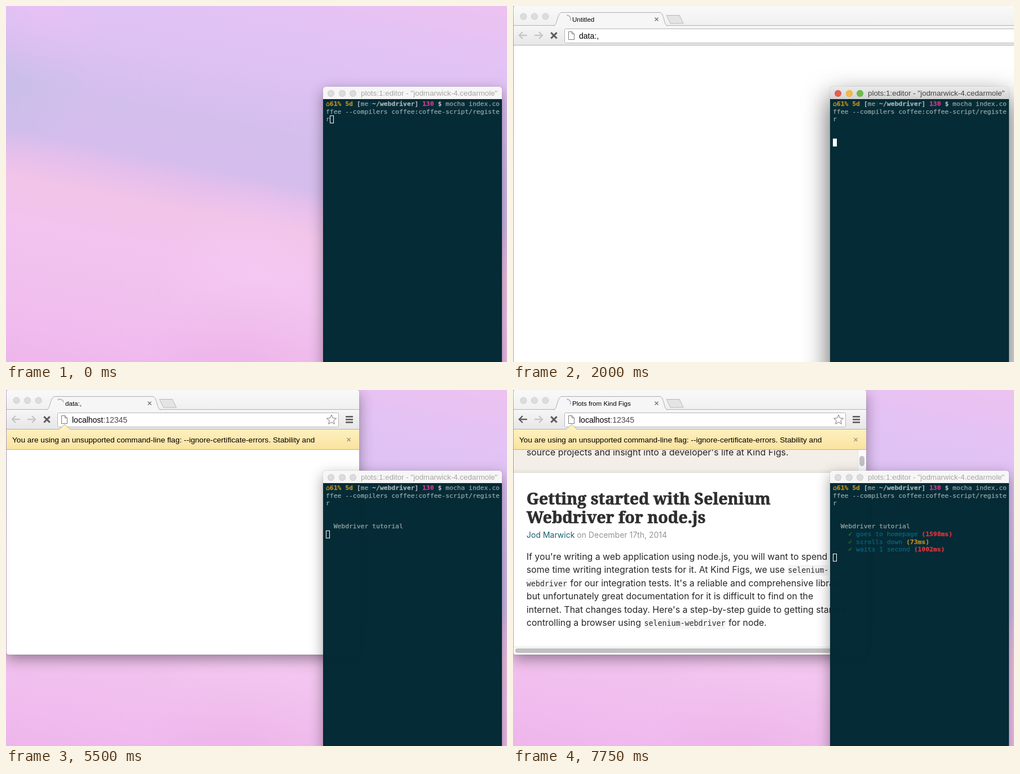
Write an HTML page with a canvas that moves like this. It is 888 px wide and 631 px high and loops after 8 s.

```html
<!DOCTYPE html>
<html lang="en">
<head>
<meta charset="utf-8">
<title>Webdriver tutorial run</title>
<style>
html, body { margin: 0; width: 100%; height: 100%; overflow: hidden; }
#stage { position: relative; width: 888px; height: 631px; overflow: hidden; font-family: "Liberation Sans", Arial, sans-serif; }
#stage canvas, .abs { position: absolute; white-space: nowrap; }
#wall, #bar { left: 0; top: 0; }

#browser { position: absolute; left: 1px; top: 0; overflow: hidden; background: #fff; border-radius: 4px; }
#inner { position: absolute; left: -1px; top: 0; }
#tab { left: 105px; top: 13px; font-size: 11.6px; line-height: 21px; color: #000; }
#url { left: 117px; top: 43px; font-size: 14px; line-height: 20px; color: #000; }
#port { color: #4a4a4a; }
#info { left: 11px; top: 78px; font-size: 13.65px; line-height: 21px; color: #000; }

#page { position: absolute; left: 1px; top: 106px; width: 625px; height: 363px; overflow: hidden; }
#view { position: absolute; left: 0; top: 0; width: 610px; height: 349px; overflow: hidden; }
#doc { position: absolute; left: -1px; width: 626px; height: 1200px; font: 15.85px/23.4px Inter, sans-serif; color: #262626; }
#head { left: 0; top: 106px; width: 626px; height: 236px; background: #f3efe8; box-shadow: inset 0 -8px 10px -8px rgba(0,0,0,.14); }
#logo { left: 1px; top: 124px; width: 72px; height: 72px; border-radius: 50%; background: #383733; }
.serif { font-family: "Noto Serif", serif; font-weight: 700; color: #2e2e2e; -webkit-text-stroke: .025em #2e2e2e; }
#name { left: 89px; top: 128px; font-size: 51.5px; line-height: 60px; }
#headline { left: 24px; top: 371px; font-size: 28.5px; line-height: 33px; }
.link { color: #145f70; }
.nav { top: 155px; }
#intro { left: 24px; top: 224px; }
#byline { left: 24px; top: 440px; font-size: 14px; color: #949494; }
#body { left: 24px; top: 479px; }
code { font: 13.3px/1 "DejaVu Sans Mono", monospace; background: #f5f5f5; padding: 2px 0; margin: 0 1px; color: #2c2c2c; }
.track { background: #fafafa; }
.thumb { background: #c1c1c1; border-radius: 5px; }
#bubble { left: 0; top: 343px; width: 208px; height: 20px; box-sizing: border-box; padding-left: 5px; background: #f0f0f0; border: 1px solid #bcbcbc; border-width: 1px 1px 0 0; border-radius: 0 4px 0 0; font-size: 11.5px; line-height: 19px; color: #555; }

#term { position: absolute; left: 562px; top: 143px; width: 317px; height: 560px; border-radius: 5px 5px 0 0; }
#title { left: 0; top: 0; width: 317px; height: 22px; border-radius: 5px 5px 0 0; font-size: 13.35px; line-height: 23px; }
#title b { position: absolute; top: 5.5px; width: 12px; height: 12px; border-radius: 50%; box-shadow: inset 0 0 0 1px rgba(0,0,0,.08); }
#title span { position: absolute; left: 67px; }
#shell { left: 0; top: 22px; width: 317px; height: 540px; background: rgba(2,41,51,.985); }
pre { position: absolute; left: 5px; top: 2px; margin: 0; font: 11.37px/13.67px "DejaVu Sans Mono", monospace; color: #98a5a5; -webkit-text-stroke: .25px; }
.hi { color: #a8b3b3; font-weight: 700; }
.gold { color: #c08f1c; font-weight: 700; }
.pink { color: #d63a86; font-weight: 700; }
.red { color: #e8343a; font-weight: 700; }
.dim { color: #14506a; }
.step { color: #0b6680; }
.tick { color: #3f8420; }
#caret { position: absolute; width: 7px; height: 14px; box-sizing: border-box; border: 1px solid #fff; }
</style>
</head>
<body>
<div id="stage">
  <canvas id="wall" width="888" height="631"></canvas>

  <div id="browser"><div id="inner">
    <canvas id="bar" width="900" height="106"></canvas>
    <span class="abs" id="tab"></span>
    <span class="abs" id="url"><span id="host"></span><span id="port"></span></span>
    <span class="abs" id="info">You are using an unsupported command-line flag: --ignore-certificate-errors. Stability and<span id="rest"> security will suffer.</span></span>
    <div id="page">
      <div id="view"><div id="doc">
        <div class="abs" id="head"></div>
        <div class="abs" id="logo"></div>
        <div class="abs serif" id="name">Plots</div>
        <span class="abs link nav" style="left:277px">Blog</span>
        <span class="abs link nav" style="left:339px">Open Source</span>
        <span class="abs link nav" style="left:466px">News</span>
        <div class="abs" id="intro">Plots is the developer site from the team building the platform for local food<br>shopping and distribution at <span class="link">kindfigs.com</span>. Here we share our<br>experiences building applications with full-stack JavaScript, our open<br>source projects and insight into a developer's life at Kind Figs.</div>
        <div class="abs serif" id="headline">Getting started with Selenium<br>Webdriver for node.js</div>
        <div class="abs" id="byline"><span class="link">Jod Marwick</span> on December 17th, 2014</div>
        <div class="abs" id="body">If you're writing a web application using node.js, you will want to spend<br>some time writing integration tests for it. At Kind Figs, we use <code>selenium-</code><br><code style="margin-left:0">webdriver</code> for our integration tests. It's a reliable and comprehensive library<br>but unfortunately great documentation for it is difficult to find on the<br>internet. That changes today. Here's a step-by-step guide to getting started<br>controlling a browser using <code>selenium-webdriver</code> for node.</div>
      </div></div>
      <div class="abs track" style="left:610px;top:0;width:15px;height:363px;box-shadow:inset 1px 0 #e4e4e4"></div>
      <div class="abs track" style="left:0;top:349px;width:610px;height:14px;box-shadow:inset 0 1px #e4e4e4"></div>
      <div class="abs thumb" id="vthumb" style="left:613px;width:9px;height:18px"></div>
      <div class="abs thumb" style="left:3px;top:352px;width:580px;height:8px"></div>
      <div class="abs" id="bubble">Waiting for localhost...</div>
    </div>
  </div></div>

  <div id="term">
    <div class="abs" id="title"><b style="left:8px"></b><b style="left:27.5px"></b><b style="left:47px"></b><span>plots:1:editor - "jodmarwick-4.cedarmole"</span></div>
    <div class="abs" id="shell">
<pre><span class="gold">⌂61% 5d</span> <span class="hi">[</span>me<span class="dim">:</span><span class="hi">~/webdriver]</span> <span class="pink">130</span> <span class="hi">$</span> mocha index.co
ffee --compilers coffee:coffee-script/registe
r


<span data-from="5000">  Webdriver tutorial</span>
<span data-from="6750">    <span class="tick">✓</span> <span class="step">goes to homepage</span> <span class="red">(1598ms)</span></span>
<span data-from="6750">    <span class="tick">✓</span> <span class="step">scrolls down</span> <span class="gold">(73ms)</span></span>
<span data-from="7750">    <span class="tick">✓</span> <span class="step">waits 1 second</span> <span class="red">(1002ms)</span></span></pre>
      <div id="caret"></div>
    </div>
  </div>
</div>

<script>
const LOOP = 8000;
const $ = id => document.getElementById(id);
const show = (el, on) => { el.style.display = on ? '' : 'none'; };
const between = (t, a, b) => t >= a && t < b;
const lights = [...document.querySelectorAll('#title b')];
const lines = [...document.querySelectorAll('[data-from]')];
const ctx = $('bar').getContext('2d');

const SHADOW = {
  front: '0 0 1px rgba(0,0,0,.5), 0 18px 46px rgba(0,0,0,.66)',
  back: '0 0 1px rgba(0,0,0,.45), 0 8px 24px rgba(0,0,0,.38)'
};

function gradient(c, y0, y1, stops) {
  const g = c.createLinearGradient(0, y0, 0, y1);
  stops.forEach(([p, color]) => g.addColorStop((p - y0) / (y1 - y0), color));
  return g;
}

// Sheared colour bands, plus soft spots near the edges.
function paintWall() {
  const c = $('wall').getContext('2d');
  c.save();
  c.transform(1, 0.2, 0, 1, 0, 0);
  c.fillStyle = gradient(c, -180, 640, [
    [-180, '#edc2f0'], [-90, '#e4c2f4'], [0, '#dfc2f4'], [60, '#dac0f1'],
    [130, '#d3bfec'], [215, '#d5bdec'], [250, '#e5bfec'], [300, '#f1c4e8'],
    [380, '#f2c4ef'], [480, '#f1c0ee'], [560, '#f0bbee'], [640, '#eeb5ea']]);
  c.fillRect(0, -200, 888, 1000);
  c.restore();
  const spot = (x, y, r, rgb, alpha) => {
    const g = c.createRadialGradient(x, y, 0, x, y, r);
    g.addColorStop(0, `rgba(${rgb},${alpha})`);
    g.addColorStop(1, `rgba(${rgb},0)`);
    c.fillStyle = g;
    c.fillRect(0, 0, 888, 631);
  };
  spot(0, 130, 150, '194,190,230', 0.6);
  spot(60, 0, 130, '234,192,245', 0.7);
  spot(440, 480, 170, '244,203,243', 0.6);
  spot(420, 660, 180, '232,166,224', 0.4);
}

function line(points, color, width) {
  ctx.beginPath();
  points.forEach(([x, y]) => ctx.lineTo(x, y));
  ctx.strokeStyle = color;
  ctx.lineWidth = width;
  ctx.stroke();
}

function polygon(points, fill, stroke) {
  ctx.beginPath();
  points.forEach(([x, y]) => ctx.lineTo(x, y));
  ctx.closePath();
  ctx.fillStyle = fill;
  ctx.fill();
  if (!stroke) return;
  ctx.strokeStyle = stroke;
  ctx.lineWidth = 1;
  ctx.stroke();
}

function sheet(x, y, w, h) {
  const f = 4;
  polygon([[x, y], [x + w - f, y], [x + w, y + f], [x + w, y + h], [x, y + h]], '#fff', '#777');
  line([[x + w - f, y], [x + w - f, y + f], [x + w, y + f]], '#777', 1);
}

function arrow(x, dir, color) {
  line([[x - 7 * dir, 52], [x + 6 * dir, 52]], color, 2.4);
  line([[x + dir, 46], [x + 7 * dir, 52], [x + dir, 58]], color, 2.4);
}

function cross(x, y, r, color, width) {
  line([[x - r, y - r], [x + r, y + r]], color, width);
  line([[x + r, y - r], [x - r, y + r]], color, width);
}

function reload() {
  ctx.beginPath();
  ctx.arc(72, 52.5, 5.8, 0.4, 5.5);
  ctx.strokeStyle = '#5c5c5c';
  ctx.lineWidth = 2.4;
  ctx.stroke();
  polygon([[79.5, 45], [79.5, 51.5], [73, 51.5]], '#5c5c5c');
}

function star(x, y) {
  const points = Array.from({ length: 10 }, (_, i) => {
    const a = -Math.PI / 2 + i * Math.PI / 5, r = i % 2 ? 4 : 9;
    return [x + r * Math.cos(a), y + r * Math.sin(a)];
  });
  polygon(points, '#fff', '#777');
}

function spinner(t) {
  const step = from => Math.floor((t - from) / 250);
  const busy = between(t, 5750, 7000);
  const start = t < 5000 ? 2000 : t < 5750 ? 5250 : 7750;
  const mid = busy ? 0.5 + 1.1 * step(5750) : -0.6 - 0.6 * step(start);
  ctx.beginPath();
  ctx.arc(95.5, 23, 6.6, mid - 1, mid + 1);
  ctx.strokeStyle = busy ? '#3a78c3' : '#a3b4ca';
  ctx.lineWidth = busy ? 2.2 : 1.7;
  ctx.stroke();
}

function paintBar(t, s) {
  const w = s.wide ? 900 : 626;
  ctx.clearRect(0, 0, 900, 106);
  ctx.fillStyle = gradient(ctx, 0, 35, [[0, '#f9f9f9'], [35, '#f0f0f0']]);
  ctx.fillRect(0, 0, w, 35);
  for (const x of [18.5, 38, 57.5]) {
    ctx.beginPath();
    ctx.arc(x, 18.5, 5.6, 0, 7);
    ctx.fillStyle = '#dcdcdc';
    ctx.fill();
    ctx.strokeStyle = '#cfcfcf';
    ctx.lineWidth = 1;
    ctx.stroke();
  }
  polygon([[272, 16.5], [295, 16.5], [302, 31], [279, 31]], '#e4e4e4', '#b9b9b9');

  ctx.fillStyle = gradient(ctx, 35, 69, [[35, '#f6f6f6'], [69, '#e7e7e7']]);
  ctx.fillRect(0, 35, w, 34);
  line([[0, 34.5], [w, 34.5]], '#b2b2b2', 1);
  ctx.beginPath();
  ctx.moveTo(72, 35.5);
  ctx.bezierCurveTo(79, 34, 78, 11.5, 87, 11.5);
  ctx.lineTo(260, 11.5);
  ctx.bezierCurveTo(268, 11.5, 267, 34, 274, 35.5);
  ctx.fillStyle = '#f6f6f6';
  ctx.fill();
  ctx.strokeStyle = '#acacac';
  ctx.lineWidth = 1;
  ctx.stroke();
  ctx.fillStyle = '#f6f6f6';
  ctx.fillRect(73, 35, 200, 2);
  cross(254.5, 23.5, 3, '#777', 1.5);

  arrow(18, -1, s.loaded ? '#5c5c5c' : '#c6c6c6');
  arrow(45, 1, '#c6c6c6');
  if (s.stop) cross(72.5, 52.3, 5.2, '#5c5c5c', 3);
  else reload();

  ctx.beginPath();
  ctx.roundRect(91.5, 40.5, s.wide ? 820 : 498, 25, 2);
  ctx.fillStyle = '#fff';
  ctx.fill();
  ctx.strokeStyle = '#b6b6b6';
  ctx.lineWidth = 1;
  ctx.stroke();
  if (!s.wide) {
    star(577, 53);
    ctx.fillStyle = '#5c5c5c';
    for (const y of [46, 51, 56]) ctx.fillRect(602, y, 13, 2.6);
  }
  line([[0, 69.5], [w, 69.5]], '#b0b0b0', 1);

  if (s.info) {
    ctx.fillStyle = gradient(ctx, 70, 105, [[70, '#fef0bd'], [105, '#fae3a0']]);
    ctx.fillRect(0, 70, w, 35);
    polygon([[94, 70.5], [104, 61], [114, 70.5]], '#fef0bd');
    line([[94, 69.5], [104, 61], [114, 69.5]], '#b9b3a0', 1);
    line([[0, 105.5], [w, 105.5]], '#b5b0a0', 1);
    if (!s.wide) cross(607.5, 88, 3, '#a0987c', 1.5);
  }
  sheet(98.5, 45.5, 10, 14);
  if (s.spin) spinner(t);
  else sheet(91.5, 16.5, 9, 13);
}

function paintBrowser(t) {
  const s = {
    wide: t < 5000,
    info: t >= 3000,
    loaded: t >= 5750,
    stop: t < 3000 || between(t, 5250, 6750) || t >= 7750,
    spin: t < 3000 || between(t, 5250, 7000) || t >= 7750
  };
  const b = $('browser');
  show(b, t >= 2000);
  if (t < 2000) return;
  b.style.width = s.wide ? '1200px' : '625px';
  b.style.height = s.wide ? '800px' : '469px';
  b.style.boxShadow = SHADOW.back;
  paintBar(t, s);

  $('tab').textContent = s.loaded ? 'Plots from Kind Figs' : s.info ? 'data:,' : 'Untitled';
  $('host').textContent = t >= 5250 ? 'localhost' : 'data:,';
  $('port').textContent = t >= 5250 ? ':12345' : '';
  show($('info'), s.info);
  show($('rest'), s.wide);
  show($('page'), s.loaded);
  show($('bubble'), between(t, 6000, 6500));
  const scroll = t >= 6750 ? 195 : 0;
  $('doc').style.top = -106 - scroll + 'px';
  $('vthumb').style.top = (scroll ? 11 : 2) + 'px';
}

function paintTerminal(t) {
  const active = between(t, 500, 5000);
  $('term').style.boxShadow = active ? SHADOW.front : SHADOW.back;
  $('title').style.background = active ? 'linear-gradient(#ebebeb, #d2d2d2)' : '#f6f6f6';
  $('title').style.color = active ? '#444' : '#a6a6a6';
  const colors = ['#e85d53', '#f6b946', '#6bbd48'];
  lights.forEach((el, i) => { el.style.background = active ? colors[i] : '#dcdcdc'; });
  lines.forEach(el => { el.style.visibility = t >= +el.dataset.from ? 'visible' : 'hidden'; });

  const row = t < 750 ? 2 : t < 1250 ? 3 : t < 5000 ? 5 : t < 6750 ? 6 : t < 7750 ? 8 : 9;
  const caret = $('caret').style;
  caret.left = (t < 750 ? 12 : 5) + 'px';
  caret.top = Math.round(2 + row * 13.67) + 'px';
  caret.background = active ? '#fff' : 'none';
}

function frame(now) {
  const t = now % LOOP;
  paintBrowser(t);
  paintTerminal(t);
  requestAnimationFrame(frame);
}

paintWall();
frame(0);
</script>
</body>
</html>
```
